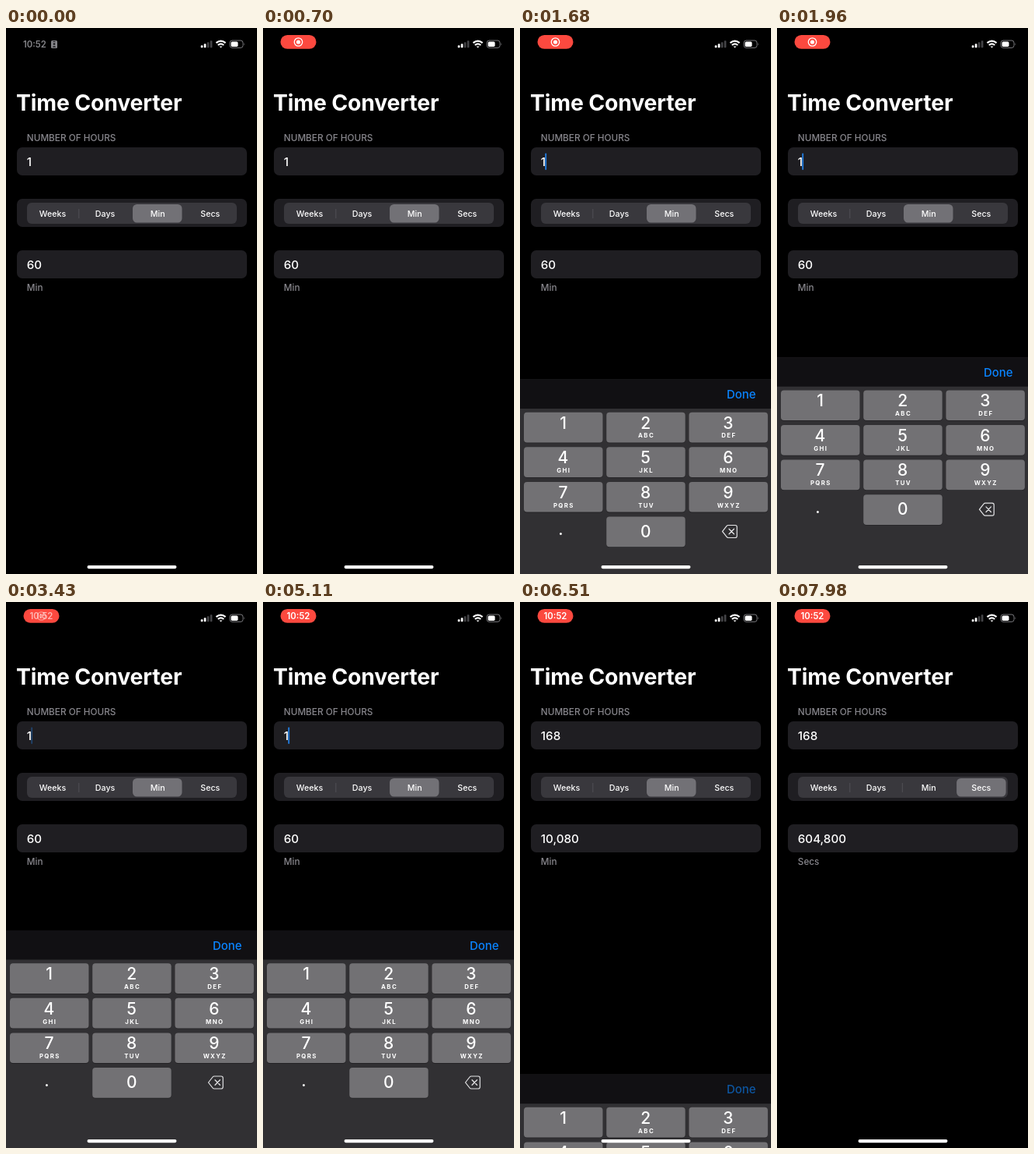
Animation, 323 px wide and 700 px high, one loop 8 s. Source, as an HTML page:

```html
<!DOCTYPE html>
<html lang="en">
<head>
<meta charset="utf-8">
<title>Time Converter</title>
<style>
html, body { margin: 0; width: 100%; height: 100%; overflow: hidden; background: #000; }
svg { display: block; width: 100%; height: 100%; font-family: Inter, "Liberation Sans", sans-serif; }
.mid { text-anchor: middle; }
.title { font-size: 28.3px; font-weight: 700; letter-spacing: -.12px; }
.value { font-size: 15.2px; font-weight: 450; }
.note { font-size: 11.75px; font-weight: 450; fill: #88878d; }
.tab { font-size: 10.7px; font-weight: 550; }
.clock { font-size: 11.3px; font-weight: 600; }
.digit { font-size: 21px; font-weight: 450; }
.abc { font-size: 7.8px; font-weight: 700; letter-spacing: 1.4px; }
.done { font-size: 14.9px; font-weight: 450; fill: #0a84ff; }
</style>
</head>
<body>
<svg viewBox="0 0 323 700" fill="#fff">
  <rect width="323" height="700" fill="#000"/>
  <g id="idle" fill="#858589">
    <text class="clock" x="22" y="25">10:52</text>
    <rect x="58" y="16" width="8" height="10" rx="1.5"/>
    <g fill="#17171a"><rect x="60.5" y="17" width="3" height="1"/><circle cx="62" cy="20.5" r="1.3"/><path d="M59.7 24.7q2.3-3.6 4.6 0z"/></g>
  </g>
  <g id="pill">
    <rect x="22.5" y="9" width="46" height="17.8" rx="8.9" fill="#fc493f"/>
    <g id="dot"><circle cx="45.5" cy="18" r="5.2" fill="none" stroke="#fff" stroke-width="1.3"/><circle cx="45.5" cy="18" r="2.6"/></g>
    <text id="time" class="clock mid" x="45.5" y="22">10:52</text>
  </g>
  <g id="bars"></g>
  <g fill="none" stroke="#fff" stroke-width="2.3">
    <path d="M270.5 19.2q6-5.2 12 0M272.8 22q3.7-3.2 7.4 0"/>
    <path d="M274.5 23.4h4l-2 2.2z" fill="#fff" stroke="none"/>
  </g>
  <rect x="288" y="16" width="17" height="9.4" rx="3" fill="none" stroke="#77777b"/>
  <rect x="289.5" y="17.5" width="9" height="6.4" rx="1.6"/>
  <path d="M306.5 19.2q1.6 1.5 0 3z" fill="#77777b"/>

  <text class="title" x="12.9" y="105.7">Time Converter</text>
  <text class="note" x="26.8" y="145">NUMBER OF HOURS</text>
  <g fill="#1f1e22">
    <rect x="14" y="153" width="296" height="36" rx="7"/>
    <rect x="14" y="219" width="296" height="36" rx="7"/>
    <rect x="14" y="285" width="296" height="36" rx="7"/>
  </g>
  <text id="hours" class="value" x="26.8" y="176.7"></text>
  <rect id="caret" y="160.5" width="1.8" height="21.5" rx=".9" fill="#2380e6"/>
  <rect x="27" y="224" width="270" height="27" rx="6" fill="#39383d"/>
  <rect x="93.3" y="232" width="1" height="12" fill="#515056"/>
  <rect id="split" x="160.8" y="232" width="1" height="12" fill="#515056"/>
  <rect id="thumb" y="226" width="63.5" height="23.5" rx="5.5" fill="#727176"/>
  <g id="tabs"></g>
  <text id="result" class="value" x="26.8" y="308.5"></text>
  <text id="unit" class="note" x="26.8" y="337"></text>

  <g id="board">
    <rect width="323" height="300" fill="#313033"/>
    <rect width="323" height="37.5" fill="#111013"/>
    <text id="done" class="done mid" x="284.7" y="24.7">Done</text>
    <g id="keys"></g>
    <text class="digit mid" x="52.5" y="200">.</text>
    <path id="back" d="M260.5 195l5.5-7q.8-1 2-1h9q2.2 0 2.2 2.2v11.6q0 2.2-2.2 2.2h-9q-1.2 0-2-1z" stroke="#e4e4e6" stroke-width="1.2"/>
    <path id="cross" d="M269 191.7l6.4 6.6m0-6.6l-6.4 6.6" stroke-width="1.3" stroke-linecap="round"/>
  </g>
  <rect x="104.5" y="689" width="115" height="4.2" rx="2.1"/>
</svg>
<script>
const LOOP = 8000;
const $ = id => document.getElementById(id);
const clamp = x => Math.min(1, Math.max(0, x));
const ramp = (t, a, b) => clamp((t - a) / (b - a));
const smooth = x => x * x * (3 - 2 * x);
const mix = (a, b, k) => a + (b - a) * k;

// Critically damped spring from 0 to 1
function spring(t, start) {
  const x = Math.max(0, t - start) * 0.0135;
  return 1 - (1 + x) * Math.exp(-x);
}

function add(parent, tag, attrs, text = '') {
  const el = document.createElementNS('http://www.w3.org/2000/svg', tag);
  for (const name in attrs) el.setAttribute(name, attrs[name]);
  el.textContent = text;
  parent.append(el);
  return el;
}

function setText(id, text) {
  if ($(id).textContent !== text) $(id).textContent = text;
}

[3, 5, 7, 9].forEach((h, i) => add($('bars'), 'rect',
  { x: 250.7 + i * 4, y: 25.3 - h, width: 2.7, height: h, rx: 0.7, fill: i < 2 ? '#fff' : '#444447' }));

['Weeks', 'Days', 'Min', 'Secs'].forEach((name, i) =>
  add($('tabs'), 'text', { class: 'tab mid', x: 60 + i * 67.6, y: 241.7 }, name));

const keys = {};
['', 'ABC', 'DEF', 'GHI', 'JKL', 'MNO', 'PQRS', 'TUV', 'WXYZ', '0'].forEach((letters, i) => {
  const zero = letters === '0';
  const x = 5 + (zero ? 1 : i % 3) * 106.2;
  const y = 42.2 + Math.floor(i / 3) * 44.6;
  const n = zero ? 0 : i + 1;
  add($('keys'), 'rect', { x, y: y + 0.8, width: 101.5, height: 38.7, rx: 4, fill: '#232225' });
  keys[n] = add($('keys'), 'rect', { x, y, width: 101.5, height: 38.7, rx: 4 });
  add($('keys'), 'text', { class: 'digit mid', x: x + 50.5, y: y + (zero ? 26.2 : 20.9) }, n);
  if (!zero) add($('keys'), 'text', { class: 'abc mid', x: x + 51.4, y: y + 32.8 }, letters);
});

const taps = { 1: [4620, 4760], 6: [5250, 5390], 8: [5530, 5670] };
const entries = [[0, '1'], [4060, ''], [4760, '1'], [5390, '16'], [5670, '168']];

function keyColor(t, n) {
  const [down, up] = taps[n] || [LOOP, LOOP];
  const k = t < down ? 0 : 1 - ramp(t, up, up + 100);
  return `rgb(${[114, 113, 116].map(c => Math.round(mix(c, c - 44, k)))})`;
}

function draw(t) {
  const pill = smooth(ramp(t, 40, 490));
  $('idle').setAttribute('opacity', 1 - pill);
  $('pill').setAttribute('opacity', pill);
  const clock = smooth(ramp(t, 3080, 3700));
  $('dot').setAttribute('opacity', 1 - clock);
  $('time').setAttribute('opacity', clock);

  setText('hours', entries.filter(e => e[0] <= t).pop()[1]);
  const focused = t >= 1400 && t < 6370;
  const blink = 1 - ramp(t, 2350, 2520) + ramp(t, 3360, 3540);
  $('caret').setAttribute('opacity', focused ? blink : 0);
  $('caret').setAttribute('x', 26 + $('hours').getComputedTextLength());

  const secs = t >= 7140;
  const slide = smooth(ramp(t, 7050, 7400));
  $('thumb').setAttribute('x', mix(163, 231.1, slide));
  $('split').setAttribute('opacity', slide);
  setText('result', secs ? '604,800' : t >= 6370 ? '10,080' : '60');
  setText('unit', secs ? 'Secs' : 'Min');

  const shown = spring(t, 1398) - spring(t, 6343);
  $('board').setAttribute('transform', `translate(0 ${mix(700, 421, shown)})`);
  $('board').setAttribute('visibility', t >= 1400 && t < 7000 ? 'visible' : 'hidden');
  $('done').setAttribute('opacity', mix(1, 0.6, ramp(t, 6200, 6300)));
  for (const n in keys) keys[n].setAttribute('fill', keyColor(t, n));
  const erasing = t >= 4060 && t < 4200;
  $('back').setAttribute('fill', erasing ? '#fff' : 'none');
  $('cross').setAttribute('stroke', erasing ? '#313033' : '#e4e4e6');
}

function tick(now) {
  draw(now % LOOP);
  requestAnimationFrame(tick);
}
draw(0);
requestAnimationFrame(tick);
</script>
</body>
</html>
```
